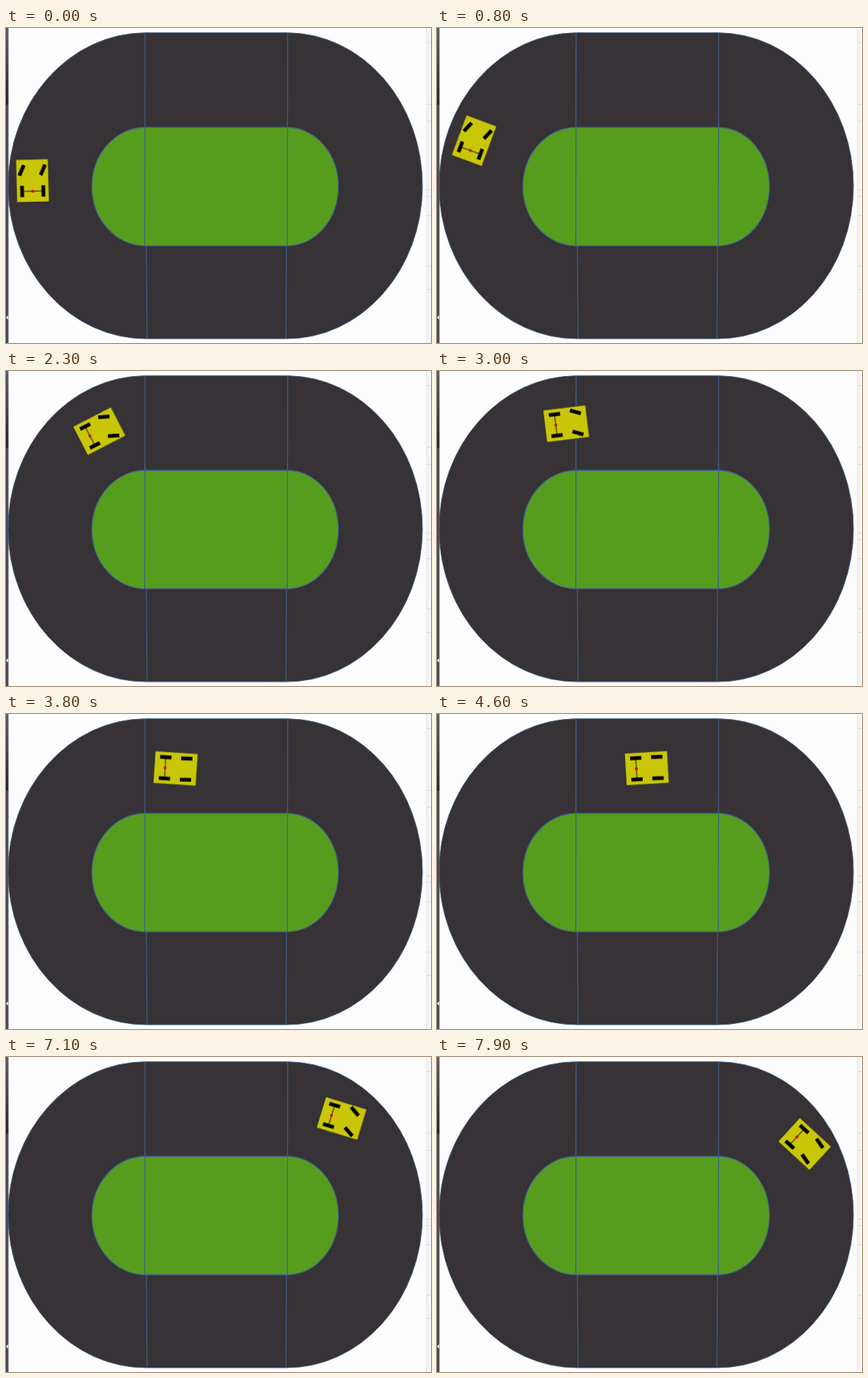
An HTML page without scripts for the animation above (8 s loop, 599 px wide and 444 px high).

```html
<!DOCTYPE html>
<html lang="en">
<head>
<meta charset="utf-8">
<title>Car on an oval track</title>
<style>
html, body { margin: 0; width: 100%; height: 100%; overflow: hidden; background: #fdfdfe; }
svg { display: block; width: 599px; height: 444px; }
.line { fill: none; stroke: #3f608f; stroke-width: 1.3; }
.edge { stroke: #4a6587; stroke-width: 1; }

/* ten poses per second: each 400 ms leg is cut into four steps */
.car, .steer { animation: drive 8s steps(4) -4ms infinite; }
.steer { animation-name: steer; }

/* rear axle position and heading */
@keyframes drive {
  0%   { transform: translate(37.7px, 230px) rotate(-91.5deg); }
  5%   { transform: translate(39.6px, 200.9px) rotate(-80.5deg); }
  10%  { transform: translate(47.1px, 172.7px) rotate(-69.6deg); }
  15%  { transform: translate(59.7px, 146.4px) rotate(-58.6deg); }
  20%  { transform: translate(77.1px, 123.1px) rotate(-47.7deg); }
  25%  { transform: translate(99.1px, 103px) rotate(-36deg); }
  30%  { transform: translate(124.8px, 87.8px) rotate(-24.4deg); }
  35%  { transform: translate(152.9px, 78px) rotate(-12.7deg); }
  40%  { transform: translate(181.9px, 74.2px) rotate(-1.3deg); }
  45%  { transform: translate(210.1px, 74.8px) rotate(4deg); }
  50%  { transform: translate(238.4px, 76.8px) rotate(3.5deg); }
  55%  { transform: translate(266.8px, 77.7px) rotate(-2.6deg); }
  60%  { transform: translate(295.2px, 76.7px) rotate(-4.2deg); }
  65%  { transform: translate(323.6px, 76.4px) rotate(1deg); }
  70%  { transform: translate(352px, 77.4px) rotate(2.2deg); }
  75%  { transform: translate(380.6px, 78px) rotate(0deg); }
  80%  { transform: translate(409.2px, 77.4px) rotate(-2.5deg); }
  85%  { transform: translate(437.8px, 77.8px) rotate(5deg); }
  90%  { transform: translate(465.9px, 83.8px) rotate(21deg); }
  95%  { transform: translate(490.9px, 98.9px) rotate(35.5deg); }
  100% { transform: translate(512.8px, 117.2px) rotate(45deg); }
}

/* front wheel angle */
@keyframes steer {
  0%   { transform: rotate(24.5deg); }
  20%  { transform: rotate(21deg); }
  35%  { transform: rotate(25deg); }
  40%  { transform: rotate(22deg); }
  45%  { transform: rotate(3deg); }
  50%  { transform: rotate(-8deg); }
  55%  { transform: rotate(-1deg); }
  60%  { transform: rotate(4deg); }
  70%  { transform: rotate(0deg); }
  75%  { transform: rotate(-3deg); }
  80%  { transform: rotate(4deg); }
  85%  { transform: rotate(28deg); }
  90%  { transform: rotate(34deg); }
  95%  { transform: rotate(20deg); }
  100% { transform: rotate(10deg); }
}
/* keep single-step timing even on the longer legs */
.steer { animation-timing-function: linear; }
</style>
</head>
<body>
<svg viewBox="0 0 599 444">
  <defs>
    <linearGradient id="rim" x2="0" y2="1">
      <stop offset="0" stop-color="#5c5e68"/>
      <stop offset="1" stop-color="#25252c"/>
    </linearGradient>
    <rect id="wheel" x="-8" y="-2.6" width="16" height="5.2"/>
  </defs>

  <!-- window edges -->
  <rect width="599" height="444" fill="#fdfdfe"/>
  <rect width="3.5" height="108" fill="url(#rim)"/>
  <rect y="108" width="3.5" height="336" fill="#484a55"/>
  <path d="M0 408l3-3v6z" fill="#f4f4f6"/>
  <rect x="593" width="6" height="444" fill="#f6f6f7"/>
  <path d="M593 0V444M593 20.5h6M593 107.5h6M593 131.5h6M593 228.5h6M593 237.5h6M593 264.5h6M593 335.5h6M593 368.5h6" stroke="#dcdce0" fill="none"/>

  <!-- track -->
  <path class="edge" fill="#363235" d="M196 6.7H397A191 215.6 0 0 1 395 438H198A194 215.6 0 0 1 196 6.7Z"/>
  <path class="line" style="fill:#569d1e" d="M196 140H397A72 83.5 0 0 1 396 307H196A75 83.5 0 0 1 196 140Z"/>
  <path class="line" d="M196 7L195.6 307M197.8 307L198.8 438M397 7L396.4 307M395.4 307L394.5 438"/>

  <g class="car">
    <rect x="-14.9" y="-22.3" width="59.4" height="44.6" fill="#c9c608"/>
    <path d="M0-15V15" stroke="#30260a" stroke-width="1.2"/>
    <use href="#wheel" y="-15"/>
    <use href="#wheel" y="15"/>
    <g transform="translate(29.7 -15)"><use class="steer" href="#wheel"/></g>
    <g transform="translate(29.7 15)"><use class="steer" href="#wheel"/></g>
    <circle r="2.2" fill="#d8140c"/>
  </g>
</svg>
</body>
</html>
```
